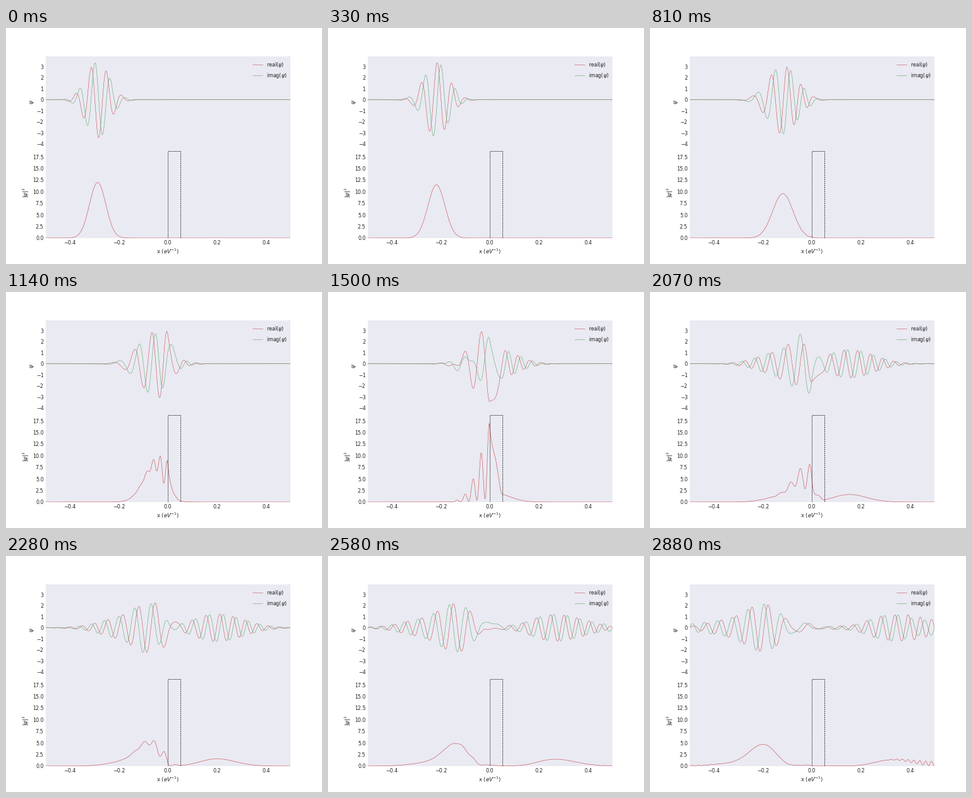
A matplotlib script that plays this animation: 500 px wide and 374 px high, repeating every 2910 ms.

```python
import numpy as np
import matplotlib.pyplot as plt
from matplotlib.animation import FuncAnimation

FRAMES, INTERVAL = 97, 30
STEP = 6.24e-5             # time per frame, hbar = m = 1
K0, X0, SIGMA = 100, -0.287, 0.0333
BARRIER, WIDTH = 5220, 0.05

plt.rcParams.update({
    "font.family": "DejaVu Sans", "font.size": 8,
    "text.color": ".15", "axes.labelcolor": ".15",
    "xtick.color": ".15", "ytick.color": ".15",
})

# Wave packet in a hard-walled box, evolved through its energy eigenstates.
N = 1000
x = np.linspace(-0.5, 0.5, N + 1)
inner = x[1:-1]
hop = N ** 2 / 2
barrier = np.where((inner > -1e-9) & (inner < WIDTH + 1e-9), BARRIER, 0)
H = np.diag(2 * hop + barrier) - hop * (np.eye(N - 1, k=1) + np.eye(N - 1, k=-1))
energy, modes = np.linalg.eigh(H)

packet = np.exp(-((inner - X0) / (2 * SIGMA)) ** 2 + 1j * K0 * inner)
packet /= np.sqrt(np.sum(abs(packet) ** 2) / N)
weights = modes.T @ packet


def wave(t):
    return np.pad(modes @ (weights * np.exp(-1j * energy * t)), 1)


fig, (top, low) = plt.subplots(
    2, 1, figsize=(500 / 72, 374 / 72), dpi=72, facecolor="white",
    gridspec_kw=dict(left=0.125, right=0.9, bottom=0.11, top=0.88, hspace=0))

for ax in (top, low):
    ax.set_facecolor("#EAEAF2")
    ax.set_xlim(-0.5, 0.5)
    ax.tick_params(length=0, pad=3.5)
    ax.tick_params(axis="y", pad=3)
    for spine in ax.spines.values():
        spine.set_visible(False)

RED, GREEN = "#C44E52", "#55A868"
real, = top.plot([], [], color=RED, lw=0.55, label=r"real($\psi$)")
imag, = top.plot([], [], color=GREEN, lw=0.55, label=r"imag($\psi$)")
density, = low.plot([], [], color=RED, lw=0.6)
low.plot([0, 0, WIDTH, WIDTH], [0, 18.72, 18.72, 0], color="black",
         lw=0.7, dashes=(3, 1.5))

top.set_ylim(-4.31, 3.95)
top.set_yticks(range(-4, 4))
top.set_xticks([])
low.set_ylim(0, 19.57)
low.set_yticks(np.arange(0, 18, 2.5))
low.set_xticks([-0.4, -0.2, 0, 0.2, 0.4])

top.set_ylabel(r"$\psi$", fontsize=8.5)
low.set_ylabel(r"$|\psi|^2$", fontsize=8.5)
low.set_xlabel(r"x ($eV^{-1}$)", fontsize=8.5)
top.yaxis.set_label_coords(-0.04, 0.5)
low.yaxis.set_label_coords(-0.06, 0.5)
low.xaxis.set_label_coords(0.501, -0.103)
top.legend(loc="upper right", bbox_to_anchor=(1.005, 1), frameon=False,
           labelspacing=0.5, borderaxespad=0.5, borderpad=0.4)


def draw(i):
    psi = wave(i * STEP)
    real.set_data(x, psi.real)
    imag.set_data(x, psi.imag)
    density.set_data(x, abs(psi) ** 2)
    return real, imag, density


anim = FuncAnimation(fig, draw, frames=FRAMES, interval=INTERVAL,
                     init_func=lambda: draw(0), repeat=True, repeat_delay=0)
plt.show()
```
